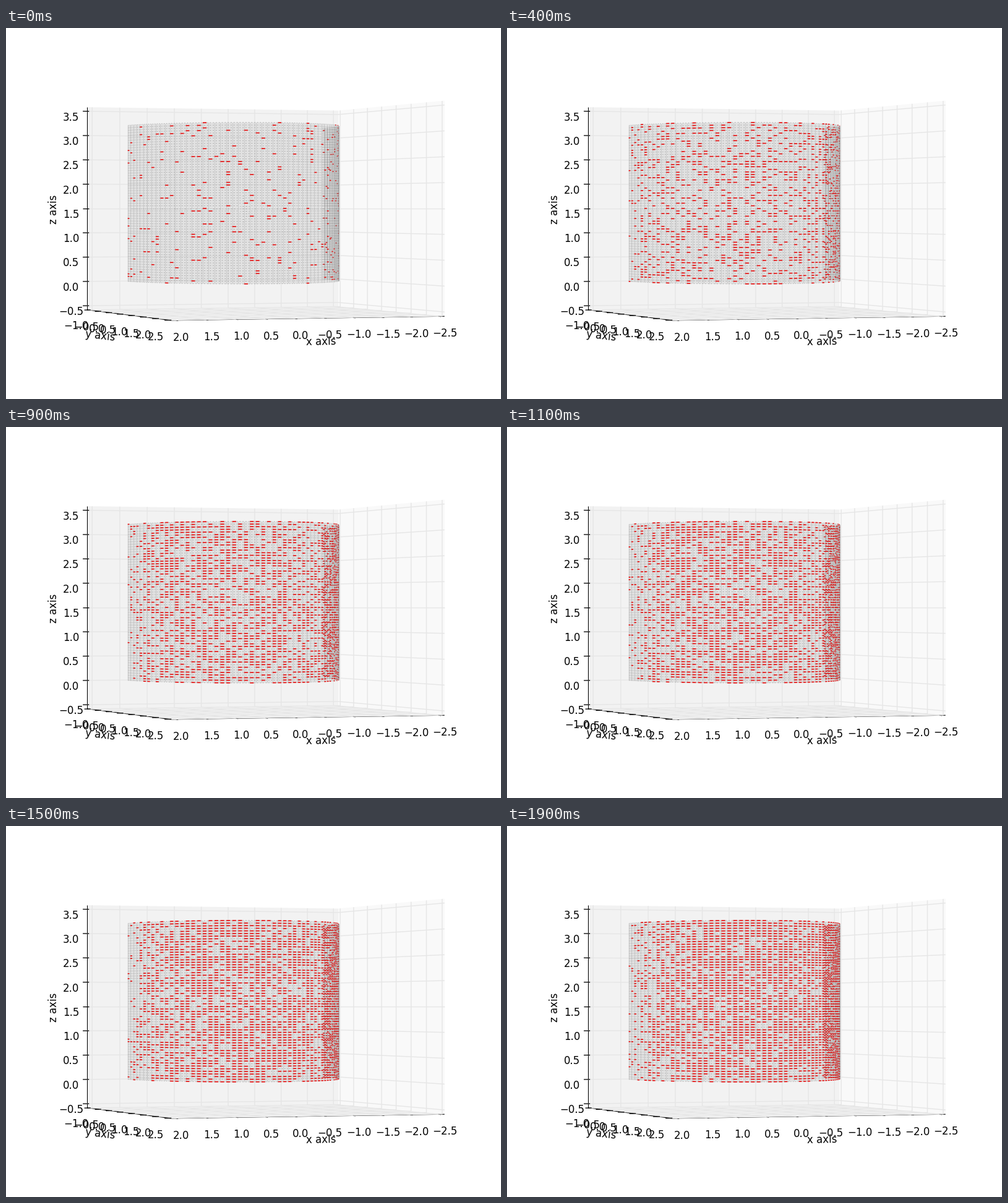
Recreate the animation shown at these times as a matplotlib script. Size 800 by 600 pixels, loop 2000 ms.

```python
import numpy as np
import matplotlib.pyplot as plt
from matplotlib.animation import FuncAnimation
from matplotlib.collections import LineCollection

W, H = 800, 600
FRAMES, INTERVAL = 20, 100
PX = 0.72                       # points per pixel at 100 dpi
AZIM, DIST = np.radians(70), 10
LIMITS = np.array([[-2.5, 2.0], [-1.0, 2.5], [-0.5, 3.5]])
SPAN = LIMITS[:, 1] - LIMITS[:, 0]
LO, HI = LIMITS[:, 0] - SPAN / 48, LIMITS[:, 1] + SPAN / 48

COLS, ROWS = 62, 63
TURN, RISE = 0.051, 0.0518      # lattice steps: angle and height
START = 0.087
RADIUS, CX, CY = 1.8915, -0.469, -1.0487
FOLD = 2.704                    # angle of the right-hand silhouette
RATE = 0.08                     # share of new dashes per step

plt.rcParams["font.family"] = "DejaVu Sans"
fig = plt.figure(figsize=(W / 100, H / 100), dpi=100, facecolor="white")
ax = fig.add_axes([0, 0, 1, 1])
ax.set_xlim(0, W)
ax.set_ylim(H, 0)
ax.axis("off")


def project(x, y, z):
    """World coordinates to stage pixels, seen level from the azimuth."""
    u, v, t = [(np.asarray(c, float) - lim[0]) / s - 0.5
               for c, lim, s in zip((x, y, z), LIMITS, SPAN)]
    side = v * np.cos(AZIM) - u * np.sin(AZIM)
    scale = DIST / (DIST - u * np.cos(AZIM) - v * np.sin(AZIM))
    px = 410.8 + 432.4 * side * scale
    py = 291.9 - 324.3 * t * scale
    return np.stack(np.broadcast_arrays(px, py), axis=-1)


def on_wall(theta, z):
    return project(CX + RADIUS * np.cos(theta), CY + RADIUS * np.sin(theta), z)


def polygon(points, color, z):
    pts = np.array(points)
    ax.fill(pts[:, 0], pts[:, 1], color=color, lw=0, zorder=z)


def lines(segments, color, width, z):
    art = LineCollection(segments, colors=[color], linewidths=width * PX,
                         capstyle="butt", zorder=z)
    ax.add_collection(art)
    return art


def world_lines(paths, color, width, z):
    lines([[project(*p) for p in path] for path in paths], color, width, z)


def label(x, y, text, angle=0, va="center"):
    ax.text(x, y, text, fontsize=12, ha="center", va=va,
            rotation=angle, zorder=20)


def tick_label(point, value):
    x, y = project(*point)
    label(x, y + 1, f"{value:.1f}".replace("-", "\u2212"), va="top")


def draw_box():
    (x0, y0, z0), (x1, y1, z1) = LO, HI
    panes = [([(x0, y0, z0), (x0, y1, z0), (x0, y1, z1), (x0, y0, z1)], "0.975"),
             ([(x0, y0, z0), (x1, y0, z0), (x1, y0, z1), (x0, y0, z1)], "0.95"),
             ([(x0, y0, z0), (x1, y0, z0), (x1, y1, z0), (x0, y1, z0)], "0.9625")]
    for corners, shade in panes:
        polygon([project(*p) for p in corners], shade, 1)

    xs, ys, zs = [np.arange(a, b + 0.01, 0.5) for a, b in LIMITS]
    ox, oy, oz = SPAN / 12
    # per axis: line, grid, ticks; later axes lie over earlier ones
    layers = [
        ([(x1, y1, z0), (x0, y1, z0)],
         [[(x, y1, z0), (x, y0, z0), (x, y0, z1)] for x in xs],
         [[(x, y1 + 0.2 * oy, z0), (x, y1 - 0.1 * oy, z0)] for x in xs]),
        ([(x1, y0, z0), (x1, y1, z0)],
         [[(x1, y, z0), (x0, y, z0), (x0, y, z1)] for y in ys],
         [[(x1 + 0.2 * ox, y, z0), (x1 - 0.1 * ox, y, z0)] for y in ys]),
        ([(x1, y0, z0), (x1, y0, z1)],
         [[(x1, y0, z), (x0, y0, z), (x0, y1, z)] for z in zs],
         [[(x1 + 0.2 * ox, y0, z), (x1 - 0.1 * ox, y0, z)] for z in zs]),
    ]
    for i, (edge, grid, ticks) in enumerate(layers):
        world_lines([edge], "black", 1.04, 2 + i)
        world_lines(grid, "0.9", 1.39, 2.1 + i)
        world_lines(ticks, "black", 1.3, 2.2 + i)

    ex, ey, ez = 0.05 * SPAN
    for x in xs:
        tick_label((x, y1 + ey, z0 - ez), x)
    for y in ys:
        tick_label((x1 + ex, y, z0 - ez), y)
    for z in zs:
        tick_label((x1 + ex, y0 - ey, z), z)
    label(509, 507.5, "x axis", 1)
    label(152, 498.5, "y axis", -7)
    label(77.5, 293, "z axis", 90)


def cell_marks(cols, shift, half):
    """Short horizontal strokes, indexed [row, column]."""
    z = np.arange(ROWS)[:, None] * RISE
    mid = START + (cols + shift)[None, :] * TURN
    return np.stack([on_wall(mid - half * TURN, z),
                     on_wall(mid + half * TURN, z)], axis=2)


def draw_sheet(cols, start, stop, z):
    """One side of the wall; returns its columns, red strokes and places."""
    top = (ROWS - 1) * RISE
    arc = np.linspace(start, stop, 60)
    outline = np.vstack([on_wall(arc, top), on_wall(arc[::-1], 0)])
    polygon(outline, (0.6, 0.6, 0.6, 0.18), z)
    for shift in (0, 0.5):
        dots = cell_marks(cols, shift, 0.08).reshape(-1, 2, 2)
        lines(dots, (0.4, 0.4, 0.4, 0.5), 1, z + 0.1)
    ribs = [on_wall(START + (c - 0.33) * TURN, np.array([0, top])) for c in cols]
    lines(ribs, (0.3, 0.3, 0.3, 0.2), 0.8, z + 0.2)
    red = lines([], (0.9, 0.04, 0.04), 1.6, z + 0.3)
    return cols, red, cell_marks(cols, 0, 0.33)


draw_box()
column = np.arange(COLS)
split = int((FOLD - START) / TURN) + 1
sheets = [
    draw_sheet(column[split:], FOLD, START + (COLS - 1) * TURN, 6),
    draw_sheet(column[:split], START - 0.33 * TURN, FOLD, 7),
]

fresh = np.random.default_rng(12).random((FRAMES, ROWS, COLS)) < RATE


def occupied(n):
    """Every dash drifts one column per step while new ones join."""
    grid = np.zeros((ROWS, COLS), bool)
    for age in range(n + 1):
        grid[:, age:] |= fresh[n - age][:, :COLS - age]
    return grid


def update(n):
    grid = occupied(n)
    for cols, red, places in sheets:
        red.set_segments(places[grid[:, cols]])
    return [s[1] for s in sheets]


anim = FuncAnimation(fig, update, frames=FRAMES, interval=INTERVAL,
                     init_func=lambda: update(0), repeat=True,
                     repeat_delay=0, blit=False)
plt.show()
```
